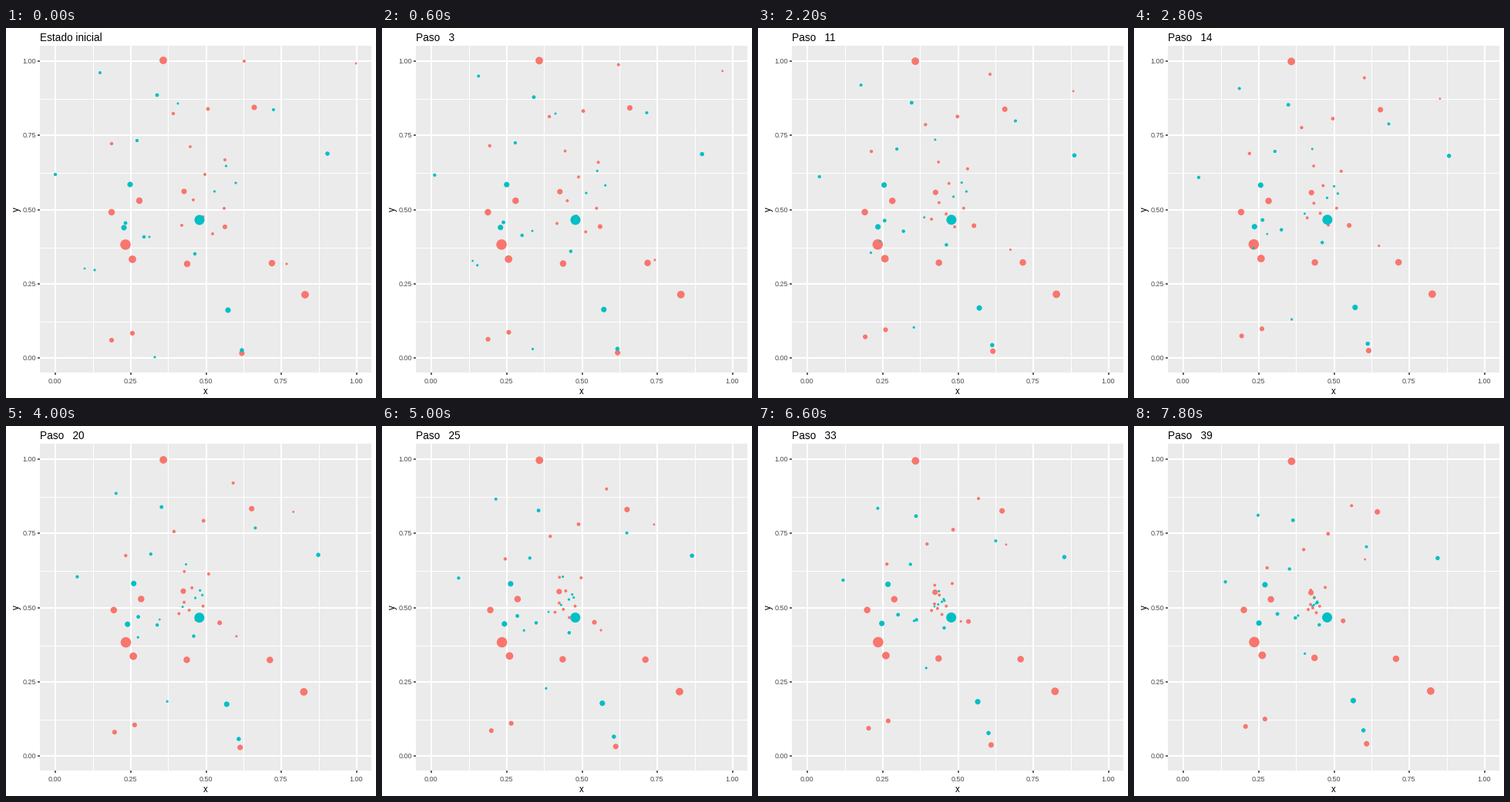
A matplotlib script that plays this animation: 480x480 px, repeating every 8000 ms.

```python
import numpy as np
import matplotlib.pyplot as plt
from matplotlib.animation import FuncAnimation

SIZE, DPI = 480, 80
STEPS, INTERVAL = 40, 200
PT = 72 / DPI                       # points per pixel
LEFT, RIGHT, TOP, BOTTOM = 44, 474, 23, 447
SOFT = 45                           # distance below which the pull fades

# Starting points by speed (pixels per step); heavy dots are large and slow.
RED = {
    .035: [(155, 281)],
    .1: [(204, 42), (164, 300), (388, 346)],
    .16: [(173, 224), (137, 239), (345, 305), (235, 306)],
    .28: [(322, 103), (231, 212), (306, 422)],
    .45: [(137, 405), (284, 258), (164, 396)],
    1: [(262, 105)],
    1.4: [(217, 111), (137, 150)],
    1.75: [(309, 43), (284, 171)],
    2.2: [(239, 154)],
    3.9: [(364, 306)],
    5.3: [(454, 46)],
}
TEAL = {
    .04: [(251, 249)],
    .28: [(153, 259), (288, 366), (161, 203)],
    .65: [(306, 418), (417, 163)],
    1: [(155, 253), (196, 87)],
    1.3: [(245, 293), (179, 271)],
    1.5: [(64, 190), (170, 146)],
    1.85: [(347, 106), (122, 58)],
    3.7: [(193, 427), (115, 314)],
    4.7: [(223, 98), (186, 271)],
    6.4: [(102, 312)],
}


def swarm(ids):
    """Light dots of the middle, zigzagging down in threes."""
    return [(313 - 5 * i - 22.5 * (i % 3), 168 + 11 * i) for i in ids]


RED[1.9] = swarm([2, 5, 6, 7, 8, 9])
TEAL[3.8] = swarm([1, 3, 4])


def simulate(groups, aim, aim_end):
    """Positions at every step while the dots drift to a moving centre."""
    pos = np.array([p for row in groups.values() for p in row], float)
    speed = np.array([s for s, row in groups.items() for _ in row])
    aim, aim_end = np.array(aim, float), np.array(aim_end, float)
    path = [pos]
    for step in range(STEPS - 1):
        gap = aim + (aim_end - aim) * step / (STEPS - 1) - pos
        dist = np.sqrt((gap ** 2).sum(axis=1) + SOFT ** 2)
        pos = pos + gap * (speed / dist)[:, None]
        path.append(pos)
    return path, 2.4 * speed ** -.31


def to_x(v):
    return LEFT + (RIGHT - LEFT) * (v + .05) / 1.1


def to_y(v):
    return BOTTOM - (BOTTOM - TOP) * (v + .05) / 1.1


def snap(v):
    return np.floor(v) + .5


plt.rcParams["font.family"] = "Liberation Sans"
fig = plt.figure(figsize=(SIZE / DPI, SIZE / DPI), dpi=DPI, facecolor="white")
ax = fig.add_axes([0, 0, 1, 1])
ax.set(xlim=(0, SIZE), ylim=(SIZE, 0))
ax.axis("off")


def line(xs, ys, color, width):
    ax.plot(xs, ys, color=color, lw=width * PT, solid_capstyle="butt", zorder=2)


def label(x, y, text, px, color="black", **kw):
    return ax.text(x, y, text, fontsize=px * PT, color=color, **kw)


def grid(x, y, width):
    line([x, x], [TOP, BOTTOM], "white", width)
    line([LEFT, RIGHT], [y, y], "white", width)


ax.add_patch(plt.Rectangle((LEFT, TOP), RIGHT - LEFT, BOTTOM - TOP,
                           fc="#EBEBEB", lw=0, zorder=1))
for v in np.arange(.125, 1, .25):
    grid(snap(to_x(v) - .2), snap(to_y(v) + .85), 1)
for v in np.linspace(0, 1, 5):
    x, y = snap(to_x(v)), snap(to_y(v))
    grid(x, y, 2)
    line([x, x], [BOTTOM, BOTTOM + 3], "#333333", 1.5)
    line([LEFT - 3, LEFT], [y, y], "#333333", 1.5)
    label(x, 461, f"{v:.2f}", 9, "#4D4D4D", ha="center")
    label(39, y + 3.5, f"{v:.2f}", 9, "#4D4D4D", ha="right")

label(259, 475, "x", 11.5, ha="center")
label(14, 235, "y", 11.5, rotation=90, ha="center", va="center")
title = label(43.5, 17, "", 13.6)

layers = []
for groups, color, aim, aim_end in [
        (RED, "#F8766D", (218, 233), (230, 234)),
        (TEAL, "#00BFC4", (243, 222), (232, 234))]:
    path, radii = simulate(groups, aim, aim_end)
    dots = ax.scatter(*path[0].T, s=(2 * radii * PT) ** 2, c=color,
                      linewidths=0, zorder=3)
    layers.append((dots, path))


def draw(step):
    title.set_text(f"Paso   {step}" if step else "Estado inicial")
    for dots, path in layers:
        dots.set_offsets(path[step])
    return [title] + [dots for dots, _ in layers]


anim = FuncAnimation(fig, draw, frames=STEPS, interval=INTERVAL,
                     repeat=True, repeat_delay=0, blit=False)
plt.show()
```
